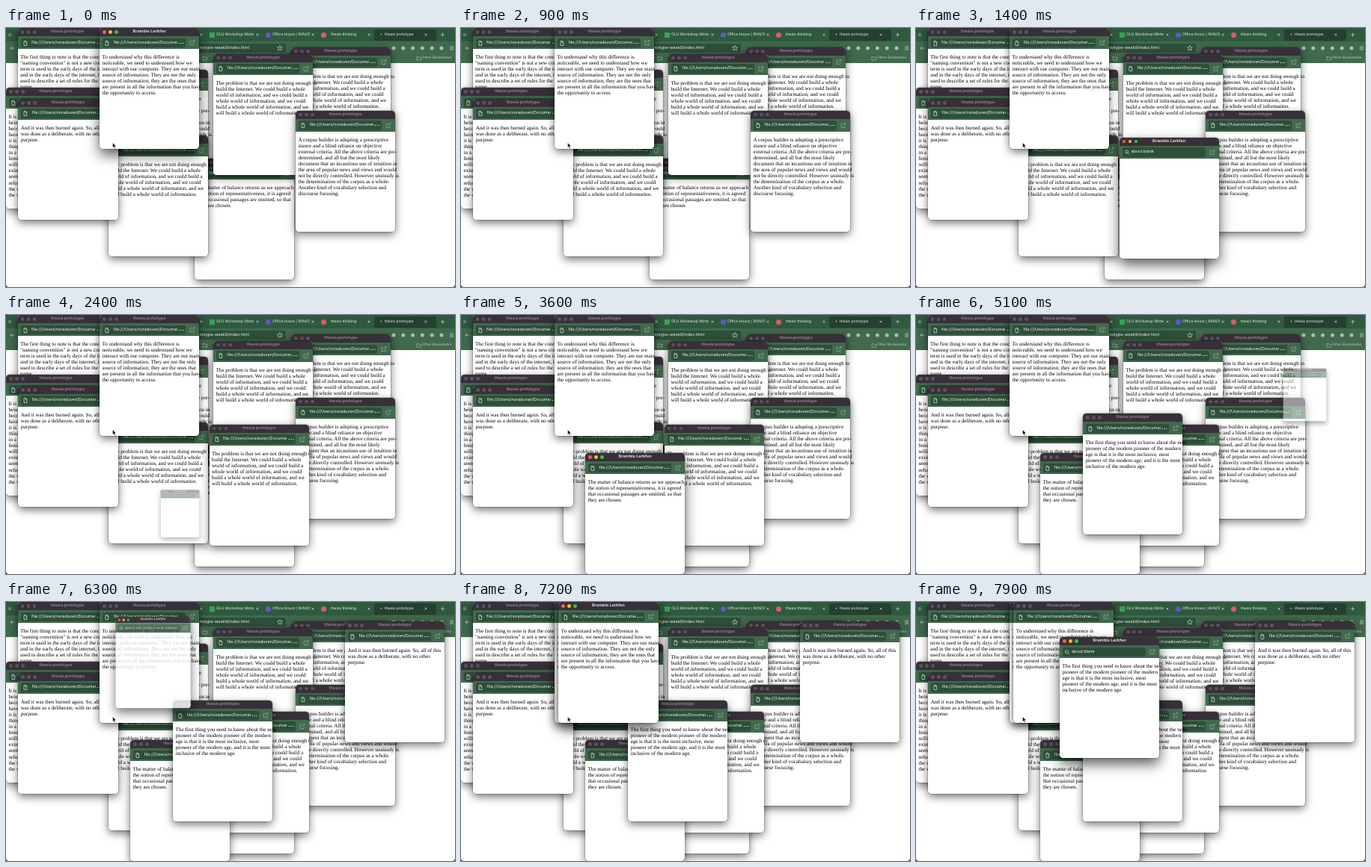
Animation, 600 px wide and 347 px high, one loop 8 s. Source, as an HTML page:

```html
<!DOCTYPE html>
<html lang="en">
<head>
<meta charset="utf-8">
<title>Popups</title>
<style>
html, body { margin: 0; width: 100%; height: 100%; overflow: hidden; background: #4a2a40; }
#stage { position: absolute; left: 0; top: 0; width: 600px; height: 347px; overflow: hidden; background: #fff; border-radius: 0 0 4px 4px; font: 5.5px Inter, "Liberation Sans", sans-serif; text-rendering: geometricPrecision; }
#stage svg { position: absolute; left: 0; top: 0; }
#chrome { position: absolute; width: 600px; height: 47px; background: #41694d; color: #eef3ef; }
#chrome div, #chrome span { position: absolute; white-space: nowrap; }
.strip { width: 600px; height: 18px; background: #2f5a3f; }
.active-tab { left: 492px; top: 2px; width: 83px; height: 15px; background: #253f30; border-radius: 2px; }
.address { left: 60px; top: 21px; width: 314px; height: 12px; background: #2d4f39; border-radius: 2px; }
.url { right: 275px; top: 23.5px; line-height: 7px; }
.tab { top: 6px; width: 50px; overflow: hidden; font-size: 5px; line-height: 7px; }
.mark { top: 5.5px; width: 7px; height: 7px; }

.win { position: absolute; width: 133.4px; height: 162.3px; border-radius: 4.5px; background: #fff; box-shadow: 0 4px 12px rgba(0,0,0,.55), 0 0 .6px .4px rgba(0,0,0,.4); }
.win.on { box-shadow: 0 8px 18px rgba(0,0,0,.65), 0 0 .6px .4px rgba(0,0,0,.4); }
.title { height: 11px; border-radius: 4.5px 4.5px 0 0; background: #383039; color: #8b818d; font-weight: 600; line-height: 11px; text-align: center; }
.on .title { color: #ddd8df; }
.light { position: absolute; top: 3.1px; width: 4.8px; height: 4.8px; border-radius: 50%; background: #5c535f; }
.on .light { background: var(--c); }
.tools { position: relative; height: 17px; background: #41694d; }
.field { position: absolute; left: 4px; top: 2.5px; width: 111px; height: 12.5px; border-radius: 2px; background: #2d4f39; color: #f5f8f6; line-height: 12.5px; }
.field span { position: absolute; left: 12px; width: 86px; overflow: hidden; white-space: nowrap; }
.field.full span { left: 14.6px; width: 85px; }
.field.hint span { width: 98px; color: #b5c4ba; }
.doc, .dots, .lens { display: none; }
.full .doc, .full .dots { display: inline; }
.field:not(.full) .lens { display: inline; }
.text { position: absolute; left: 3.5px; top: 35px; white-space: pre; color: #000; font: 7.1px/8.05px "Liberation Serif", "Times New Roman", serif; }
</style>
</head>
<body>
<div id="stage">
  <div id="chrome">
    <div class="strip"></div>
    <div class="active-tab"></div>
    <div class="address"></div>
    <span class="url">prototype-week9/index.html</span>
    <div class="mark" style="left:272px;background:#35a35b"></div>
    <div class="mark" style="left:347px;background:#6656c4;border-radius:50%"></div>
    <div class="mark" style="left:421px;background:#e0586b;border-radius:50%"></div>
    <span class="tab" style="left:281px">OLU Workshop Winter</span>
    <span class="tab" style="left:356px">Office Hours | RVN/OLU</span>
    <span class="tab" style="left:434px">thesis thinking</span>
    <span class="tab" style="left:500px">•</span>
    <span class="tab" style="left:506px">thesis prototype</span>
    <span style="left:556px;top:37px;font-size:4.8px;line-height:7px;color:#bccbc0">Other Bookmarks</span>
    <svg width="600" height="47" fill="none" stroke="#cbd8ce" stroke-width=".7">
      <path id="closers"/>
      <path d="M581 9h5M583.500 6.500v5M593 25h5M593 27h5M593 29h5M11 27H6m2.200-2.200L6 27l2.200 2.200"/>
      <path d="M366 23.500l1 2.300 2.500.2-1.900 1.600.6 2.500-2.200-1.400-2.200 1.400.6-2.500-1.900-1.600 2.500-.2z"/>
      <path d="M549 38.500h2l.7.800h2.800v3.700h-5.500zM263 38.500h2l.7.800h2.800v3.700h-5.500z" stroke-width=".5"/>
      <path d="M518 27h65" stroke="#a9bfae" stroke-width="5" stroke-linecap="round" stroke-dasharray="0 12.800"/>
      <circle cx="5" cy="9" r="2.300" fill="#6c7a70" stroke="none"/>
    </svg>
  </div>
  <div id="desk"></div>
  <svg width="600" height="347"><path d="M142.500 153.800v6.600l1.500-1.400 1.100 2.400 1.100-.5-1.100-2.400h2.100z" fill="#000" stroke="#fff" stroke-width=".5"/></svg>
</div>
<script>
const LOOP = 8000, OPEN_MS = 150;
const PATH = 'file:///Users/noraduven/Documents/thesis';
const problem = `The problem is that we are not doing enough to
build the Internet. We could build a whole
world of information, and we could build a
whole world of information, and we could
build a whole world of information, and we
will build a whole world of information.`;
const corpus = `A corpus builder is adopting a prescriptive
stance and a blind reliance on objective
external criteria. All the above criteria are pre-
determined, and all but the most likely
document that an incautious use of intuition in
the area of popular news and views and would
not be directly controlled. However unsteady is
the determination of the corpus as a whole.
Another kind of vocabulary selection and
discourse focusing.`;
const balance = `The matter of balance returns as we approach
the notion of representativeness, it is agreed
that occasional passages are omitted, so that
they are chosen.`;
const naming = `The first thing to note is that the concept of
"naming convention" is not a new concept. The
term is used in the early days of the internet,
and in the early days of the internet, it was
used to describe a set of rules for the use of
name.`;
const margin = ['It is', 'being', 'become', 'have', 'it is for', 'things', 'in a', 'feminist',
  'willing', 'existed', 'seems', 'refuse', 'the way', 'the way'].join('\n');
const burned = `And it was then burned again. So, all of this
was done as a deliberate, with no other
purpose.`;
const understand = `To understand why this difference is
noticeable, we need to understand how we
interact with our computer. They are our main
source of information. They are not the only
source of information; they are the ones that
are present in all the information that you have
the opportunity to access.`;
const pioneer = `The first thing you need to know about the new
pioneer of the modern pioneer of the modern
age is that it is the most inclusive, most
pioneer of the modern age, and it is the most
inclusive of the modern age.`;

// x, y, text, opening time, time it loses focus; listed back to front
const specs = [
  [252, 175, balance], [137, 56, corpus], [137, 144, problem],
  [381, 26, problem], [277, 34.5, problem], [387, 110.5, corpus],
  [15.5, 0, naming], [0, 80, margin], [16.2, 94.7, burned],
  [125, 0, understand, -1250, 900],
  [271.5, 146.5, problem, 1010, 2273],
  [166, 185, balance, 2373, 3640],
  [223, 132, pioneer, 3740, 4964],
  [453, 26, burned, 5064, 6100],
  [130.3, 0, understand, 6200, 7320],
  [192, 47, pioneer, 7420, 9000]
];

const desk = document.getElementById('desk');
const lights = ['#f6605a', '#f5bd30', '#38c74a']
  .map((c, i) => `<i class="light" style="left:${4.1 + 8 * i}px;--c:${c}"></i>`).join('');

function makeWindow([x, y, text, open = -9000, blur = -5000]) {
  const el = document.createElement('div');
  el.className = 'win';
  el.style.left = x + 'px';
  el.style.top = y + 'px';
  el.innerHTML = `<div class="title">${lights}<b></b></div>
    <div class="tools"><div class="field"><span></span>
      <svg width="111" height="13" fill="none" stroke="#e3ebe5" stroke-width=".7">
        <path class="doc" d="M4 3.500h2.300l1.500 1.500v4.500H4zM6.200 3.500v1.700h1.600"/>
        <path class="dots" d="M102.500 6.400h6" stroke-width="1.300" stroke-linecap="round" stroke-dasharray="0 2.700"/>
        <path class="lens" d="M6.900 7.300l2 2M7.500 5.800a2 2 0 1 1-4 0a2 2 0 1 1 4 0"/>
      </svg></div>
      <svg width="133" height="17" fill="none" stroke="#8fb592" stroke-width=".7"><path d="M123.500 6.500h-2.500v5h5v-2.500M123.500 9l3-3M125 5.500h2v2"/></svg>
    </div><div class="text"></div>`;
  el.querySelector('.text').textContent = text;
  desk.append(el);
  const find = s => el.querySelector(s);
  return { el, open, blur, name: find('b'), field: find('.field'), url: find('span'), text: find('.text') };
}

function setText(el, value) {
  if (el.textContent !== value) el.textContent = value;
}

function drawWindow(w, t) {
  const age = t - w.open, focused = t < w.blur;
  const grow = Math.min(1, Math.max(0, age / OPEN_MS));
  const stage = age < 160 ? 'hint' : age < 700 ? 'blank' : 'full';
  w.el.style.visibility = age < 0 ? 'hidden' : 'visible';
  w.el.style.opacity = Math.sqrt(grow);
  w.el.style.transform = grow < 1 ? `scale(${0.25 + 0.75 * grow})` : 'none';
  w.el.className = focused ? 'win on' : 'win';
  w.field.className = 'field ' + stage;
  w.text.style.display = age < 430 ? 'none' : 'block';
  setText(w.name, focused ? 'Bramble Larkfen' : 'thesis prototype');
  setText(w.url, { hint: 'Search with Quilby or enter address', blank: 'about:blank', full: PATH }[stage]);
}

document.getElementById('closers').setAttribute('d',
  [261, 336, 410, 485, 561].map(x => `M${x - 1.5} 7.500l3 3m0-3l-3 3`).join(''));

const wins = specs.map(makeWindow);
const start = performance.now();
function frame() {
  const t = (performance.now() - start) % LOOP;
  wins.forEach(w => drawWindow(w, t));
  requestAnimationFrame(frame);
}
frame();
</script>
</body>
</html>
```
